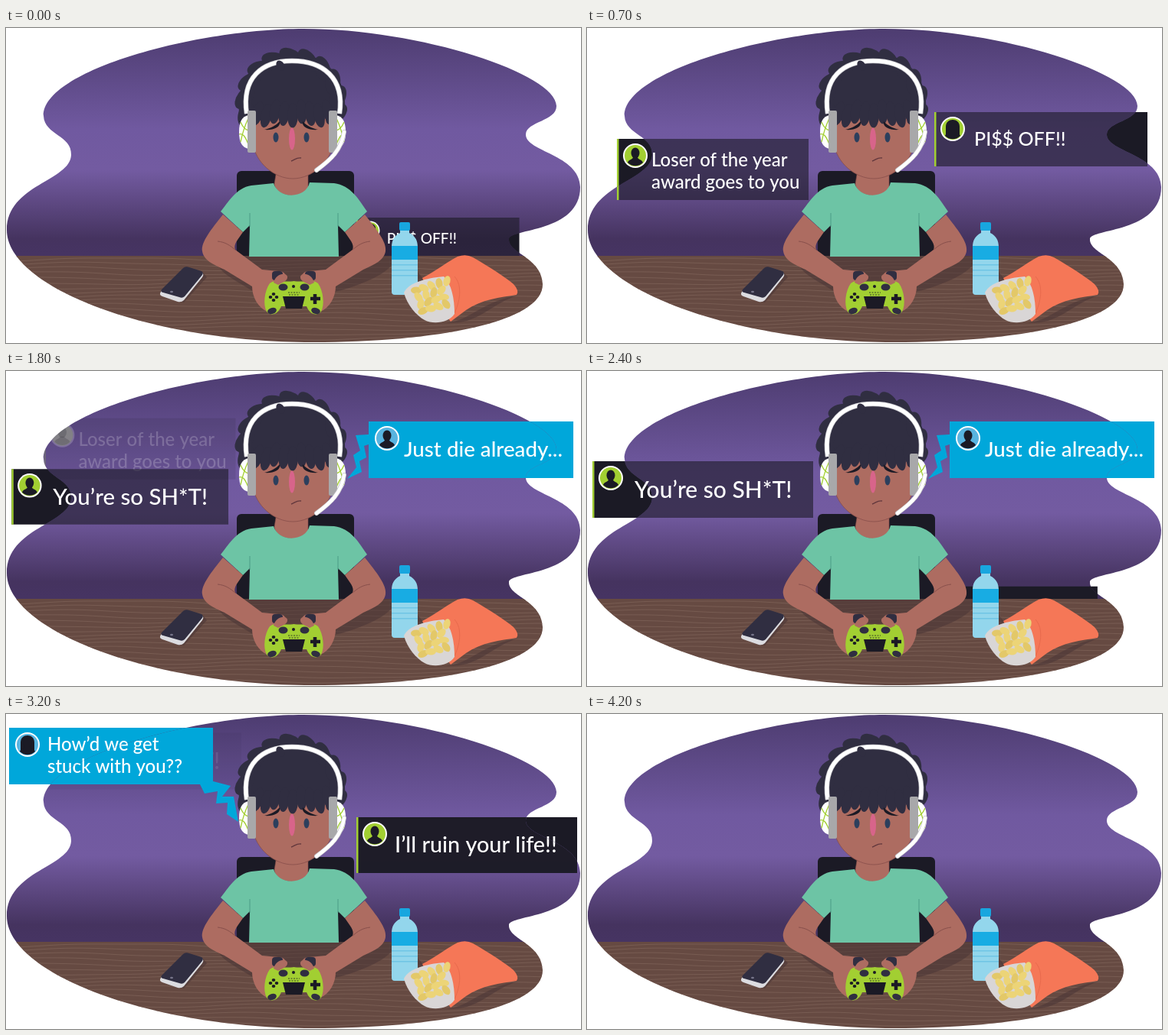
Animation, 750 px wide and 412 px high, one loop 4300 ms. Source, as an HTML page with a canvas:

```html
<!DOCTYPE html>
<html lang="en">
<head>
<meta charset="utf-8">
<title>Gamer and hostile chat</title>
<style>
html, body { margin: 0; width: 100%; height: 100%; overflow: hidden; background: #fff; }
canvas { display: block; width: 750px; height: 412px; }
</style>
</head>
<body>
<canvas width="750" height="412"></canvas>
<script>
const c = document.querySelector('canvas').getContext('2d');
const DARK = '#1b1a25', HAIR = '#302e41', SKIN = '#ad6c61', LINE = '#874f4b', SHADE = '#4b353590',
      GREEN = '#a2cf32', BLUE = '#00a7da', WHITE = '#fff';
const LOOP = 4300, STEP = 100, RISE = 400, FADE = 400, DESK = 298;

const blob = new Path2D('M388 1C250 1 48 55 49 115C50 140 86 140 85 166C84 200 1 205 1 264C1 340 190 411 400 411C560 411 701 385 700 335C699 300 655 295 656 276C657 262 749 268 749 208C748 165 677 162 678 139C679 122 718 122 718 102C718 60 540 1 388 1Z');

function path(d, fill, stroke, width = 1) {
  const p = new Path2D(d);
  if (fill) { c.fillStyle = fill; c.fill(p); }
  if (stroke) { c.strokeStyle = stroke; c.lineWidth = width; c.stroke(p); }
}
function oval(x, y, rx, ry, fill, turn = 0) {
  c.fillStyle = fill;
  c.beginPath();
  c.ellipse(x, y, rx, ry, turn, 0, 7);
  c.fill();
}
function box(x, y, w, h, r, fill) {
  c.fillStyle = fill;
  c.beginPath();
  c.roundRect(x, y, w, h, r);
  c.fill();
}
// Draws a part and its mirror image
function both(draw, axis = 375.5) {
  draw();
  c.save();
  c.transform(-1, 0, 0, 1, 2 * axis, 0);
  draw();
  c.restore();
}

// x, y is the resting place; from and to are the starts of the rise and the fade
const messages = [
  { x: 453, y: 110, w: 278, h: 71, from: -20, to: 1150, lines: ['PI$$ OFF!!'], tx: 52, ty: 44, size: 25, long: true },
  { x: 39, y: 145, w: 250, h: 80, from: 260, to: 1480, lines: ['Loser of the year', 'award goes to you'], tx: 45, ty: 36, size: 24 },
  { x: 7, y: 118, w: 288, h: 74, from: 1460, to: 2840, lines: ['You’re so SH*T!'], tx: 55, ty: 48, size: 30 },
  { x: 473, y: 66, w: 267, h: 74, from: 1145, to: 2740, lines: ['Just die already...'], tx: 46, ty: 46, size: 27.7,
    alpha: 1, bolt: 'M0 17L-17 18-11 38-20 44-16 60-28 75-9 66-12 52-3 47-6 32 0 30Z' },
  { x: 457, y: 135, w: 288, h: 73, from: 2360, to: 3660, lines: ['I’ll ruin your life!!'], tx: 50, ty: 46, size: 28.8, alpha: .97 },
  { x: 4, y: 18, w: 266, h: 74, from: 2760, to: 3560, lines: ['How’d we get', 'stuck with you??'], tx: 50, ty: 30, size: 24,
    alpha: 1, long: true, bolt: 'M248 72L255 86 272 83 270 99 285 98 284 113 299 123 293 90 278 90 289 76 266 70Z' }
];

const clamp = v => Math.min(1, Math.max(0, v));
const smooth = v => v * v * (3 - 2 * v);

function pose(m, t) {
  const rise = smooth(clamp((t - m.from) / RISE)), leave = clamp((t - m.to) / FADE);
  return {
    x: m.x + 5 * (1 - rise) + 13 * leave,
    y: 286 + (m.y - 286) * rise - 104 * leave,
    scale: .7 + .3 * rise,
    opacity: t < m.from ? 0 : 1 - leave
  };
}

function avatar(m) {
  oval(24, 22, 16, 16, WHITE);
  oval(24, 22, 14, 14, m.bolt ? '#58b4e0' : GREEN);
  if (m.long) path('M15 31V19C15 7 33 7 33 19V31Z', DARK);
  oval(24, 18.5, 5.5, 7, DARK);
  path('M14 31C15 27 21 27 21 24H27C27 27 33 27 34 31A14 14 0 0 1 14 31Z', DARK);
}

// Outside the scene a message is either solid or gone
function message(m, t, solid) {
  const p = pose(m, t);
  if (!p.opacity || (solid && p.opacity < .5)) return;
  const opacity = solid ? 1 : p.opacity;
  c.save();
  c.translate(p.x, p.y);
  c.scale(p.scale, p.scale);
  c.globalAlpha = opacity * (solid ? 1 : m.alpha ?? .6);
  box(0, 0, m.w, m.h, 0, m.bolt ? BLUE : DARK);
  c.globalAlpha = opacity;
  if (m.bolt) path(m.bolt, BLUE);
  else box(0, 0, 2.5, m.h, 0, GREEN);
  avatar(m);
  c.font = `500 ${m.size}px Lato, sans-serif`;
  c.fillStyle = WHITE;
  m.lines.forEach((s, i) => c.fillText(s, m.tx, m.ty + i * 29));
  c.restore();
}
function chat(t, solid) {
  c.save();
  c.beginPath();
  c.rect(0, 0, 750, DESK + 2);
  c.clip();
  messages.forEach(m => message(m, t, solid));
  c.restore();
}

function wall() {
  const g = c.createLinearGradient(0, 0, 0, 300);
  [[0, '#4d3c70'], [.44, '#7059a0'], [.62, '#735ba1'], [.92, '#45335f'], [1, '#463463']]
    .forEach(s => g.addColorStop(...s));
  box(0, 0, 750, 300, 0, g);
}

function desk() {
  box(0, DESK, 750, 114, 0, '#664a42');
  c.strokeStyle = '#7d6157';
  c.lineWidth = .8;
  for (let y = 303; y < 412; y += 6) {
    c.beginPath();
    for (let x = 0; x <= 750; x += 6)
      c.lineTo(x, y + 2.5 * Math.sin(x / 60 + y / 9) + .5 * Math.sin(x / 23 + y));
    c.stroke();
  }
  path('M275 298H505C514 316 462 338 425 346H325C300 330 270 318 275 298Z', SHADE);
  path('M212 354L232 359 262 326 257 320Z', SHADE);
  path('M508 346C520 352 530 346 546 330L536 318Z', SHADE);
  path('M575 385C605 384 620 357 668 350C635 358 615 390 575 385Z', SHADE);
}

function torso() {
  path('M354 180H394V208C396 224 352 224 350 204Z', SKIN, LINE, .6);
  path('M349 203L320 206C300 209 290 228 280 240L309 267 318 258 317 299H434L433 258 442 267 471 240C460 224 450 206 428 203L396 202C391 224 355 224 349 203Z', '#6dc4a5');
  both(() => path('M318 242V260', null, '#4d9c86'));
}

function arm() {
  path('M283 244C268 263 254 280 256 292C258 304 270 309 285 316L321 338C321 352 329 366 341 371H350L345 340 361 331C369 328 365 317 355 318L334 316 299 290C296 283 303 276 309 267Z', SKIN);
  path('M276 279C286 280 292 284 300 291', null, LINE);
}

function gamepad() {
  both(() => box(347, 318, 14, 12, 4, HAIR));
  both(() => path('M376 331C360 333 351 328 344 334C337 344 335 362 340 371C346 378 355 374 359 364H376Z', GREEN));
  both(() => oval(347, 370, 6, 4, HAIR, -.3));
  path('M361 351H390L386 367H365Z', DARK);
  oval(375, 338, 2, 2, DARK);
  c.setLineDash([2, 1.5]);
  path('M368 346H383M369 349H382', null, DARK, .8);
  c.setLineDash([]);
  both(() => oval(361.5, 339, 6, 4.5, HAIR));
  for (let i = 0; i < 4; i++)
    oval(349 + 4 * Math.sin(i * Math.PI / 2), 352 + 4 * Math.cos(i * Math.PI / 2), 2.3, 2.1, DARK);
  path('M397 354H410M403 348V361', null, DARK, 4.5);
  both(() => path('M349 333C352 321 365 319 367 325C368 331 360 333 355 336Z', SKIN));
}

function hair() {
  path('M304 112C300 62 330 33 372 33C415 33 446 62 442 112Z', HAIR);
  for (let i = 0; i < 11; i++) {
    const a = Math.PI * (.92 + i * .116);
    oval(372 + 61 * Math.cos(a), 98 + 60 * Math.sin(a), 17, 10, HAIR, a + 2.1);
  }
  for (let i = 0; i < 9; i++)
    oval(328 + i * 11.5, 112 + 3 * Math.sin(i * 2.1), 7, 16, HAIR, .3 - i * .07);
}

function head() {
  path('M322 100V150C325 176 350 197 374 197C400 197 424 174 427 150V100Z', SKIN, LINE, .8);
  hair();
  both(() => {
    path('M337 133C345 131 352 128 357 122C359 130 348 134 337 133Z', DARK);
    oval(352, 143, 3.5, 6.5, '#2c3f5d');
  }, 372);
  oval(373, 145, 4, 14.5, '#d8648a');
  path('M372 174C376 173 379 169 385 170', null, '#63383d', 1.4);
}

function cup() {
  path('M316 114C308 116 304 122 304 136C304 150 308 156 316 158Z', WHITE);
  path('M306 123C309 130 312 133 316 134M304 139C309 137 312 142 316 152M306 149C308 139 312 127 316 118', null, GREEN, 1.3);
  box(315, 108, 11, 55, 2, '#a8a8aa');
}

function headset() {
  const band = 'M314 112C307 65 334 43 373 43C413 43 442 65 435 112';
  const boom = 'M441 136C437 160 424 172 405 186';
  path(band, null, '#c5c5ca', 6.5);
  path(band, null, WHITE, 5);
  oval(358, 49, 7, 5, HAIR, 1);
  both(cup, 373.5);
  c.lineCap = 'round';
  path(boom, null, '#c5c5ca', 6);
  path(boom, null, WHITE, 4.5);
  c.lineCap = 'butt';
}

function phone() {
  path('M202 345L231 316Q234 312 239 314L255 319Q259 322 256 326L232 356Q229 359 224 358L204 351Q199 349 202 345Z', '#dcdce0');
  path('M203 342L231 314Q234 311 239 313L255 318Q258 320 256 323L233 351Q230 354 226 352L205 346Q201 345 203 342Z', HAIR);
  oval(216, 345, 2, 1.3, '#77758a');
}

function bottle() {
  path('M514 264H526V268C534 272 537 278 537 287V345Q537 349 533 349H507Q503 349 503 345V287C503 278 506 272 514 268Z', '#93d6ec');
  box(513, 254, 14, 11, 2, '#18a6df');
  box(503, 285, 34, 18, 0, '#18ace3');
  for (let y = 309; y < 330; y += 7) box(503, y, 34, 1.5, 0, '#6fc5e5');
}

function snacks() {
  path('M543 327C562 317 577 305 589 299Q600 295 609 300C630 312 650 325 662 335Q670 344 666 349C645 352 620 355 600 369L580 384 554 350Z', '#f57757');
  path('M585 325C596 337 592 359 584 375', null, '#e86a4d');
  path('M519 346C525 333 548 327 571 325C581 335 585 353 585 374C577 386 557 388 546 382C535 376 523 362 519 346Z', '#d9d6d6');
  for (let i = 0; i < 17; i++) {
    const row = i % 4, col = i >> 2;
    oval(535 + col * 10 + row * 3, 343 - col * 3 + row * 9, 7, 4.5, i % 3 ? '#ecd477' : '#e3c868', i * .9);
  }
}

function draw(time) {
  // The first pose is held for two steps
  const t = Math.max(STEP, Math.floor(time % LOOP / STEP) * STEP);
  c.clearRect(0, 0, 750, 412);
  chat(t, true);
  c.save();
  c.clip(blob);
  wall();
  chat(t, false);
  box(301, 187, 153, 113, 6, DARK);
  desk();
  c.restore();
  torso();
  both(arm);
  gamepad();
  head();
  headset();
  phone();
  bottle();
  snacks();
}

let start;
function tick(now) {
  start ??= now;
  draw(now - start);
  requestAnimationFrame(tick);
}
requestAnimationFrame(tick);
</script>
</body>
</html>
```
